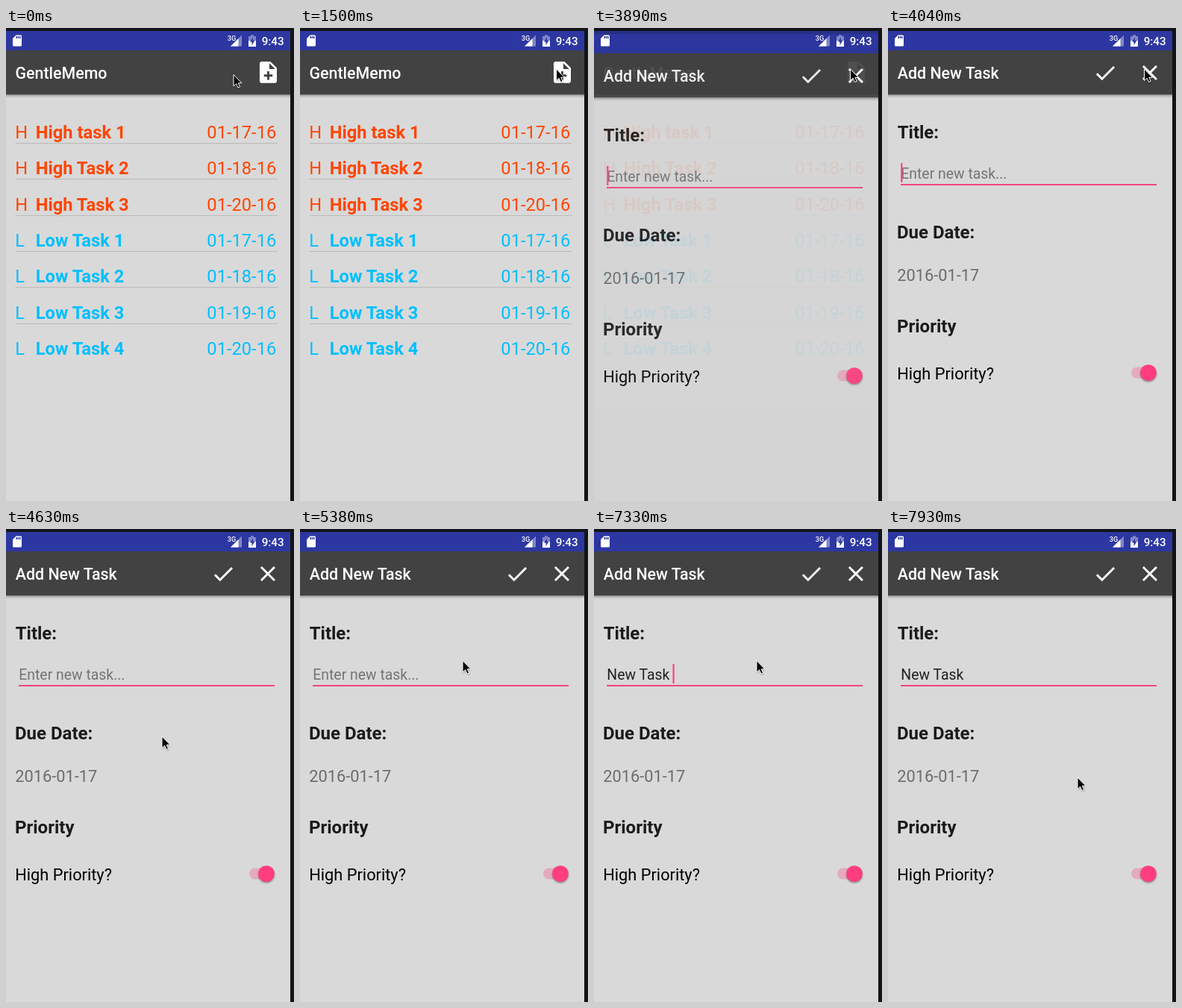
An HTML page that plays this animation: 386x634 px, repeating every 8000 ms.

```html
<!DOCTYPE html>
<html lang="en">
<head>
<meta charset="utf-8">
<title>Task list</title>
<style>
  html, body { margin: 0; width: 100%; height: 100%; overflow: hidden; background: #121419; }
  svg { display: block; width: 386px; height: 634px; font-family: Roboto, sans-serif; }
  text { white-space: pre; }
  .title { font-size: 21.4px; font-weight: 500; fill: #fff; }
  .row { font-size: 23.7px; }
  .name { font-weight: 700; }
  .date { text-anchor: end; }
  .label { font-size: 24px; font-weight: 700; fill: #1b1b1b; }
  .value { font-size: 21.8px; }
  .field { font-size: 19.4px; }
  .icon { fill: #fff; }
</style>
</head>
<body>
<svg viewBox="0 0 386 634">
  <defs>
    <linearGradient id="shade" x2="0" y2="1">
      <stop offset="0" stop-opacity=".42"/>
      <stop offset=".4" stop-opacity=".15"/>
      <stop offset="1" stop-opacity="0"/>
    </linearGradient>
    <filter id="soft" x="-50%" y="-50%" width="200%" height="200%">
      <feGaussianBlur stdDeviation="1.2"/>
    </filter>
    <g id="page">
      <path fill="#d9d9d9" d="M0 4H381V634H0z"/>
      <path fill="#2d37a1" d="M0 4H381V30H0z"/>
      <path fill="#424242" d="M0 30H381V89H0z"/>
      <path fill="url(#shade)" d="M0 89H381V94H0z"/>
    </g>
  </defs>

  <g id="list">
    <use href="#page"/>
    <text class="title" x="12.5" y="68">GentleMemo</text>
    <circle id="ripple" cx="351" cy="60" r="21.3" fill="#515151"/>
    <path class="icon" transform="translate(334.2 42.1) scale(1.44)" d="M14 2H6c-1.1 0-2 .9-2 2v16c0 1.1.9 2 2 2h12c1.1 0 2-.9 2-2V8l-6-6zm2 14h-3v3h-2v-3H8v-2h3v-3h2v3h3v2zm-3-7V3.5L18.5 9H13z"/>
    <g id="rows"></g>
  </g>

  <g id="form">
    <use href="#page"/>
    <text class="title" x="12.7" y="68">Add New Task</text>
    <path class="icon" transform="translate(274 43.1) scale(1.43)" d="M9 16.17L4.83 12l-1.42 1.41L9 19 21 7l-1.41-1.41z"/>
    <path class="icon" transform="translate(333.8 42.9) scale(1.43)" d="M19 6.41L17.59 5 12 10.59 6.41 5 5 6.41 10.59 12 5 17.59 6.41 19 12 13.41 17.59 19 19 17.59 13.41 12z"/>
    <text class="label" x="12.7" y="147.5">Title:</text>
    <text class="field" id="field" x="17.3" y="201.5"></text>
    <path fill="#f5427f" d="M17 209H360V211H17z"/>
    <rect id="caret" y="181" width="2.2" height="26" fill="#ff4081"/>
    <text class="label" x="12" y="282">Due Date:</text>
    <text class="value" x="12.2" y="338.7" fill="#6c6c6c">2016-01-17</text>
    <text class="label" x="12" y="408.3">Priority</text>
    <text class="value" x="12.2" y="470.5">High Priority?</text>
    <rect x="326" y="454.5" width="30" height="15" rx="7.5" fill="#e4abbe"/>
    <circle cx="349" cy="463.5" r="10.8" opacity=".4" filter="url(#soft)"/>
    <circle cx="349" cy="462" r="10.8" fill="#ff3d7f"/>
  </g>

  <g id="status" fill="#fff">
    <path transform="translate(6 8) scale(.75)" d="M18 2h-8L4 8v12c0 1.1.9 2 2 2h12c1.1 0 2-.9 2-2V4c0-1.1-.9-2-2-2zm-6 6h-2V4h2v4zm3 0h-2V4h2v4zm3 0h-2V4h2v4z"/>
    <text x="296.7" y="16.5" font-size="9.2" font-weight="500">3G</text>
    <path opacity=".4" d="M301 24.5L316 9.5V24.5z"/>
    <path d="M301 24.5L311.5 14V24.5z"/>
    <path opacity=".4" d="M325 11h3V9.3h4V11h3v6h-10z"/>
    <path d="M325 17h10v8h-10z"/>
    <path fill="#2d37a1" d="M331 12.5l-4 6h2.5V23l4-6.2H331z"/>
    <text x="342.7" y="23" font-size="15.2" font-weight="500">9:43</text>
  </g>

  <g id="pointer">
    <path opacity=".35" filter="url(#soft)" transform="translate(.5 1.5)" d="M0 0V15.5L3.6 12.2L6 17.5L8.6 16.4L6.3 11.3H11z"/>
    <path stroke="#fff" d="M0 0V15.5L3.6 12.2L6 17.5L8.6 16.4L6.3 11.3H11z"/>
  </g>
</svg>
<script>
const LOOP = 8000;
const $ = id => document.getElementById(id);

// Each step: start time, then the values held until the next step.
const pointerSteps = [
  [0, 305, 62.5], [900, 311.5, 62.5], [1050, 361, 61.5], [1200, 364, 61.5], [1500, 343.5, 55],
  [4480, 224, 197], [4630, 209, 278], [4780, 209, 221], [4930, 218, 176.5],
  [7630, 236, 305], [7780, 246.5, 370], [7930, 254, 333]
];
const HINT = 'Enter new task...';
const typingSteps = [
  [0, HINT, 17.2], [4340, HINT, null], [4930, HINT, 17.2], [5380, HINT, null],
  [5830, 'N', 31.4], [5980, 'Ne', 41.4], [6130, 'New', 55.9], [6280, 'New ', 60.7],
  [6880, 'New Ta', 80.8], [7180, 'New Tas', 90.8], [7330, 'New Task ', 105.5],
  [7930, 'New Task ', null]
];

const tasks = [
  ['High task 1', 17], ['High Task 2', 18], ['High Task 3', 20],
  ['Low Task 1', 17], ['Low Task 2', 18], ['Low Task 3', 19], ['Low Task 4', 20]
];
$('rows').innerHTML = tasks.map(([name, day], i) => {
  const y = 148 + i * 48.35;
  const color = name[0] === 'H' ? '#ff4500' : '#00bfff';
  const line = i < tasks.length - 1
    ? `<rect x="13" y="${Math.round(y + 5.9)}" width="351" height="1" fill="#b9b9b9"/>` : '';
  return `${line}<g class="row" fill="${color}">
    <text x="12.2" y="${y}">${name[0]}</text>
    <text class="name" x="39.8" y="${y}">${name}</text>
    <text class="date" x="362.3" y="${y}">01-${day}-16</text></g>`;
}).join('');

const stepAt = (steps, t) => steps.findLast(step => step[0] <= t);
const show = (el, visible) => el.setAttribute('visibility', visible ? 'visible' : 'hidden');

function draw(t) {
  const [, x, y] = stepAt(pointerSteps, t);
  $('pointer').setAttribute('transform', `translate(${x} ${y})`);

  const [, text, caretX] = stepAt(typingSteps, t);
  $('field').textContent = text;
  $('field').setAttribute('fill', text === HINT ? '#747474' : '#202020');
  $('caret').setAttribute('x', caretX ?? 0);
  $('caret').setAttribute('opacity', caretX === null ? 0 : 1);

  // The form rises and fades in over the dimming list.
  const opening = t >= 3890 && t < 4040;
  show($('ripple'), t >= 3740);
  show($('list'), t < 4040);
  if (t >= 4040) show($('ripple'), false);
  show($('form'), t >= 3890);
  $('list').setAttribute('opacity', opening ? 0.8 : 1);
  $('form').setAttribute('opacity', opening ? 0.9 : 1);
  $('form').setAttribute('transform', `translate(0 ${opening ? 4 : 0})`);
}

let start;
function tick(now) {
  start ??= now;
  draw((now - start) % LOOP);
  requestAnimationFrame(tick);
}
draw(0);
requestAnimationFrame(tick);
</script>
</body>
</html>
```
